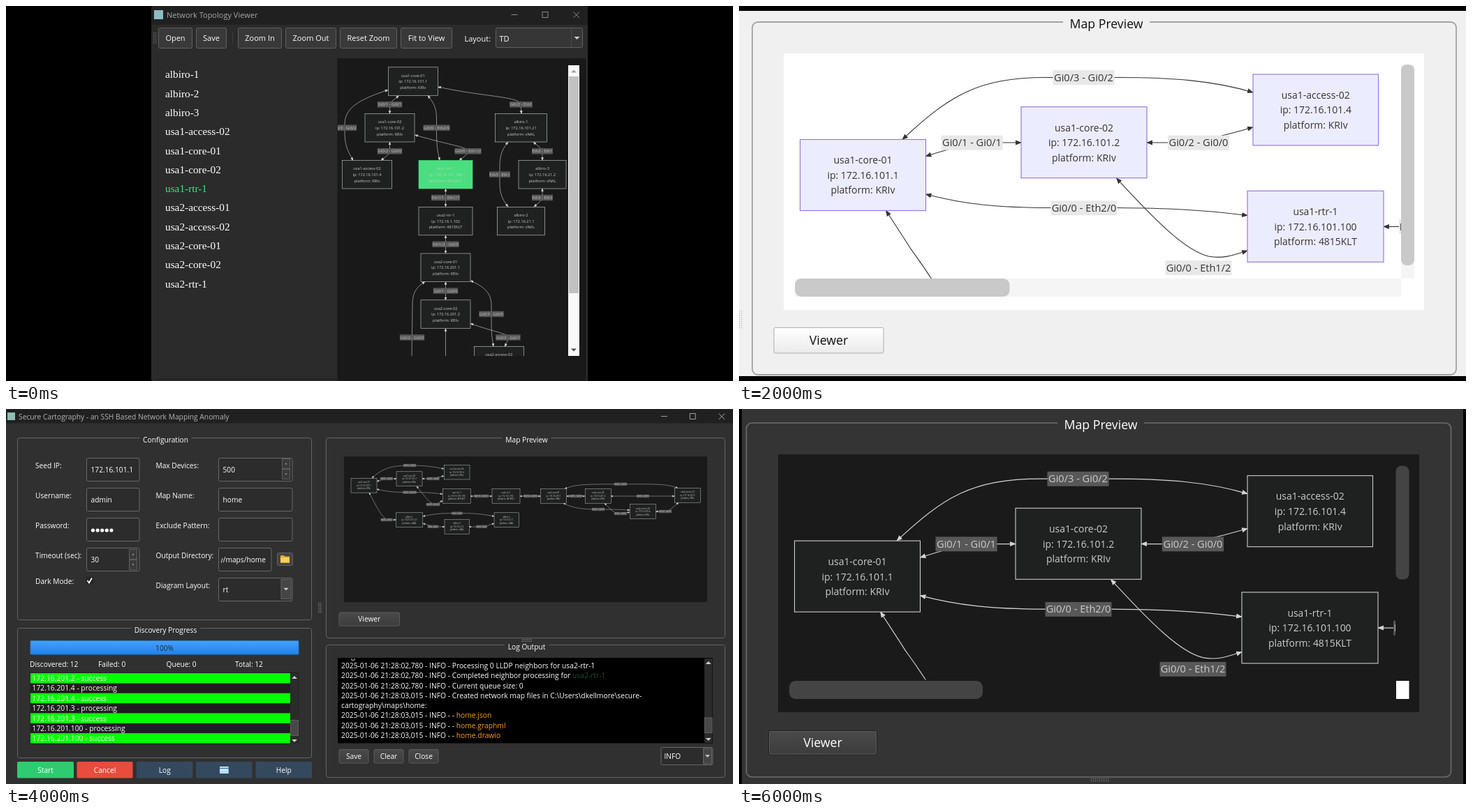
An HTML page for the animation above (8000 ms loop, 1041x538 px).

```html
<!DOCTYPE html>
<html lang="en">
<head>
<meta charset="utf-8">
<title>Network map viewer</title>
<style>
html, body { margin: 0; width: 100%; height: 100%; overflow: hidden; background: #000; }
svg { display: block; width: 1041px; height: 538px; font-family: "Open Sans", "Noto Sans", sans-serif; }
.scene { visibility: hidden; animation: show 8s step-end infinite; }
#preview-light { animation-delay: -6s; }
#main { animation-delay: -4s; }
#preview-dark { animation-delay: -2s; }
@keyframes show { 0% { visibility: visible; } 25%, 100% { visibility: hidden; } }
.edge { fill: none; }
.light .node { fill: #ececff; stroke: #9370db; }
.light .edge { stroke: #333; marker-start: url(#tipD); marker-end: url(#tipD); }
.light .tag { fill: #e8e8e8; }
.light text { fill: #333; }
.dark .node { fill: #1f2020; stroke: #ccc; }
.dark .edge { stroke: #d3d3d3; marker-start: url(#tipL); marker-end: url(#tipL); }
.dark .tag { fill: #585858; }
.dark text { fill: #ccc; }
.dark .hot .node { fill: #4ade80; stroke: #4ade80; }
.dark .hot text { fill: #b0d8b6; }
.graph .open { marker-end: none; }
</style>
</head>
<body>
<svg viewBox="0 0 1041 538">
  <defs>
    <marker id="tipD" viewBox="0 0 10 10" refX="9" refY="5" markerWidth="8" markerHeight="8" orient="auto-start-reverse"><path d="M0 1L10 5L0 9z" fill="#333"/></marker>
    <marker id="tipL" viewBox="0 0 10 10" refX="9" refY="5" markerWidth="8" markerHeight="8" orient="auto-start-reverse"><path d="M0 1L10 5L0 9z" fill="#d3d3d3"/></marker>
    <linearGradient id="pale" x2="0" y2="1"><stop stop-color="#fff"/><stop offset="1" stop-color="#ebebeb"/></linearGradient>
    <linearGradient id="dim" x2="0" y2="1"><stop stop-color="#4a4a4a"/><stop offset="1" stop-color="#3c3c3c"/></linearGradient>
    <linearGradient id="blue" x2="0" y2="1"><stop stop-color="#45a0ff"/><stop offset="1" stop-color="#1f82ea"/></linearGradient>
    <clipPath id="topoClip"><path d="M475 85H805V502H475z"/></clipPath>
    <clipPath id="mapClip"><path d="M80 84H948V391H80z"/></clipPath>
    <clipPath id="logClip"><path d="M475 358H1000V479H475z"/></clipPath>
    <clipPath id="dirClip"><path d="M308 200H378V231H308z"/></clipPath>
  </defs>
  <g class="scene" id="viewer"></g>
  <g class="scene" id="preview-light"></g>
  <g class="scene" id="main"></g>
  <g class="scene" id="preview-dark"></g>
</svg>
<script>
const rect = (x, y, w, h, fill, more = '') =>
  `<rect x="${x}" y="${y}" width="${w}" height="${h}" fill="${fill}" ${more}/>`;
const path = (d, stroke, more = '') => `<path d="${d}" fill="none" stroke="${stroke}" ${more}/>`;
const fillPath = (d, fill) => `<path d="${d}" fill="${fill}"/>`;
// y is the middle of the line
const text = (x, y, s, size, fill = '#fff', more = '') =>
  `<text x="${x}" y="${y + size * 0.35}" font-size="${size}" fill="${fill}" ${more}>${s}</text>`;
const mid = (x, y, s, size, fill) => text(x, y, s, size, fill, 'text-anchor="middle"');
const box = (x, y, w, h, fill, stroke, r = 2) =>
  rect(x + 0.5, y + 0.5, w - 1, h - 1, fill, `stroke="${stroke}" rx="${r}"`);
const button = (x, y, w, h, s, size, fill = 'url(#dim)', stroke = '#5c5c5c', ink = '#fff') =>
  box(x, y, w, h, fill, stroke) + mid(x + w / 2, y + h / 2, s, size, ink);
const tri = (x, y, r, dir, fill) =>
  fillPath(`M${x - r} ${y - dir * r / 2}h${2 * r}l${-r} ${dir * r}z`, fill);
const dots = (x, y, cols, rows, step, fill) => {
  let s = '';
  for (let i = 0; i < cols * rows; i++)
    s += rect(x + (i % cols) * step, y + Math.floor(i / cols) * step, 1.3, 1.3, fill);
  return s;
};
const put = (id, parts) => { document.getElementById(id).innerHTML = parts.flat().join(''); };

const devices = {
  c1: ['usa1-core-01', '172.16.101.1', 'KRIv'],
  c2: ['usa1-core-02', '172.16.101.2', 'KRIv'],
  a2: ['usa1-access-02', '172.16.101.4', 'KRIv'],
  r1: ['usa1-rtr-1', '172.16.101.100', '4815KLT'],
  R1: ['usa2-rtr-1', '172.16.1.102', '4815KLT'],
  C1: ['usa2-core-01', '172.16.201.1', 'KRIv'],
  C2: ['usa2-core-02', '172.16.201.2', 'KRIv'],
  A1: ['usa2-access-01', '172.16.201.3', 'KRIv'],
  A2: ['usa2-access-02', '172.16.201.4', 'KRIv'],
  x1: ['albiro-1', '172.16.101.21', 'vNAL'],
  x2: ['albiro-2', '172.16.21.1', 'vNAL'],
  x3: ['albiro-3', '172.16.21.2', 'vNAL'],
};

// nodes: [id, x, y, w]; tags: [x, y, text]; an edge starting with "!" has no end tip
function graph(theme, size, h, line, nodes, edges, tags, hot) {
  const node = ([id, x, y, w]) => {
    const [name, ip, kind] = devices[id];
    const rows = [name, 'ip: ' + ip, 'platform: ' + kind];
    return `<g class="${id === hot ? 'hot' : ''}">` +
      rect(x, y, w, h, 'none', `class="node" stroke-width="${line}"`) +
      rows.map((s, i) => mid(x + w / 2, y + h / 2 + 0.04 * size + (i - 1) * size * 1.545, s, size)).join('') + '</g>';
  };
  const edge = d => `<path class="edge ${d[0] === '!' ? 'open' : ''}" stroke-width="${line}" d="${d.replace('!', '')}"/>`;
  const tag = ([x, y, s]) => {
    const w = s.length * size * 0.486, th = size * 1.5;
    return rect(x - w / 2, y - th / 2, w, th, '', 'class="tag"') + mid(x, y, s, size * 1.045);
  };
  return `<g class="graph ${theme}">` + edges.map(edge).join('') + nodes.map(node).join('') + tags.map(tag).join('') + '</g>';
}

const controls = (x, y, gap, ink) =>
  path(`M${x - 4} ${y}h9M${x + gap - 4} ${y - 4}h8v8h-8zM${x + 2 * gap - 4} ${y - 4}l8.500 8.500m0 -8.500l-8.500 8.500`, ink);

// Topology window
const topo = graph('dark', 5.6, 40.5, 0.6, [
  ['c1', 547.3, 87.8, 71], ['c2', 514, 154.5, 71], ['a2', 481.5, 221.5, 71], ['r1', 591, 221.5, 77],
  ['R1', 591, 288.3, 77], ['C1', 594, 355, 71], ['C2', 594, 421.8, 71], ['A2', 670.3, 488.5, 71],
  ['x1', 700.5, 154.5, 74], ['x3', 734, 221.5, 68], ['x2', 703.5, 288.3, 68],
], [
  'M547 120.500C503 135 485 147 485 170V180C485 199 489 208 497 221.500',
  'M562.500 128.500C553 137 549.500 138 549.500 141V154.500',
  'M604 128.500C613 140 616.500 146 616.500 162V182C616.500 200 618 208 621 221.500',
  'M618.500 116C682 130 737 130 737 141L738 154.500',
  'M549.500 195V208C549 213 545 215 537 221.500',
  'M585.500 185C640 201 661 202 661 208S658 214 649 221.500',
  'M629.500 262V288', 'M629.500 329V355', 'M629.500 395.500V422',
  '!M600 395.500C585 405 582 414 582 430L581 506',
  'M665 394C688 404 695 414 695 430V452C695 470 696 477 698 488.500',
  'M665 455.500C700 468 719 470 719 475S717 483 714 488.500',
  '!M629.500 462.500V506',
  'M755 195C764 203 768 205 768 208V221.500', 'M768 262V275C768 278 764 281 756 288',
  'M719 195C710 206 707 215 707 230V254C707 270 711 278 719 288',
], [
  [549.5, 141.3, 'Gi0/1 - Gi0/1'], [484.5, 174.7, 'Gi0/3 - Gi0/2'], [616.5, 174.7, 'Gi0/0 - Eth2/0'],
  [737.5, 141.3, 'Gi0/2 - Eth1'], [549.5, 208.3, 'Gi0/2 - Gi0/0'], [661.5, 208.3, 'Gi0/0 - Eth1/2'],
  [629.5, 275, 'Eth1/1 - Eth1/1'], [629.5, 341.8, 'Eth1/2 - Gi0/0'], [629.5, 408.6, 'Gi0/1 - Gi0/0'],
  [581.5, 475.5, 'Gi0/2 - Gi0/0'], [695, 442, 'Gi0/3 - Gi0/0'], [719, 475.5, 'Gi0/2 - Gi0/1'],
  [768, 208.3, 'Eth2 - Eth1'], [707, 241.6, 'Eth3 - Eth1'], [768, 275, 'Eth3 - Eth3'],
], 'r1');

const hosts = Object.values(devices).map(d => d[0]).sort();
put('viewer', [
  rect(0, 0, 1041, 538, '#000'),
  rect(208, 0, 625, 538, '#2b2b2b'),
  rect(208, 0, 625, 27, '#202020'),
  rect(212, 6, 13, 13, '#8fbcc4'),
  text(230, 13, 'Network Topology Viewer', 11, '#a8a8a8'),
  controls(727.5, 12.5, 44.5, '#8c8c8c'),
  dots(211, 38, 2, 6, 2.9, '#777'),
  [['Open', 218, 49], ['Save', 272, 44], ['Zoom In', 332, 63], ['Zoom Out', 400, 73], ['Reset Zoom', 478, 82], ['Fit to View', 565, 74]]
    .map(([s, x, w]) => button(x, 31, w, 30, s, 11, '#393939', '#606060')),
  path('M324.500 37v18', '#3d3d3d'),
  text(656.5, 47, 'Layout:', 11),
  box(701, 31, 125, 29, '#363636', '#606060'),
  text(706.5, 47, 'TD', 11),
  path('M809.500 32v27', '#4a4a4a'),
  tri(817.5, 46, 4, 1, '#d0d0d0'),
  rect(212, 535, 262, 1, '#1c1c1c'),
  rect(474.5, 75, 356, 463, '#191919'),
  hosts.map((s, i) => text(228, 98 + i * 27.3, s, 15.3, s === 'usa1-rtr-1' ? '#4ade80' : '#fff',
    'font-family="Liberation Serif, Times New Roman, serif"')),
  `<g clip-path="url(#topoClip)">${topo}</g>`,
  rect(805, 85, 16, 417, '#f8f8f8'),
  rect(806, 101, 14, 311, '#c1c1c1'),
  tri(813, 93.5, 4, -1, '#a0a0a0'),
  tri(813, 493.5, 4, 1, '#505050'),
]);

// Zoomed preview, drawn in both themes
const zoomMap = theme => graph(theme, 13.95, 102, 1.1, [
  ['c1', 87.5, 191.5, 180], ['c2', 404, 144.7, 180], ['a2', 736, 98, 179.5], ['r1', 728, 265.3, 195],
], [
  'M234 191.500C300 130 340 102.500 440 102.500H540C620 102.500 680 107 736 124',
  'M267.500 215.500C310 202 330 196 360 196H404',
  'M584 196H614C660 196 690 187 736 174',
  'M267.500 270C320 284 370 289.500 447 289.500H541C610 290 660 292 728 300.500',
  'M540.500 247C600 312 640 351 672 359C692 363 707 358 728 351',
  '!M210.500 293.500L240 339C250 356 252 355 276 392',
  '!M923 316.500H950',
], [
  [493.5, 102.7, 'Gi0/3 - Gi0/2'], [333.5, 196.2, 'Gi0/1 - Gi0/1'], [658, 196.2, 'Gi0/2 - Gi0/0'],
  [494, 289.8, 'Gi0/0 - Eth2/0'], [658, 375.7, 'Gi0/0 - Eth1/2'], [996, 316.5, 'Eth1/1 - Eth1/1'],
]);

const group = (x, y, w, h, s, size, bg, line, ink, gap, lw = 1) =>
  rect(x, y, w, h, 'none', `stroke="${line}" stroke-width="${lw}" rx="${lw > 1 ? 8 : 3}"`) +
  rect(x + w / 2 + gap[0], y - 3, gap[1], 6, bg) + mid(x + w / 2 + gap[0] + gap[1] / 2, y + 2.8, s, size, ink);

put('preview-light', [
  rect(0, 0, 1041, 538, '#000'),
  rect(0, 7, 1041, 524, '#f0f0f0'),
  group(19, 23, 1008, 506, 'Map Preview', 17.7, '#f0f0f0', '#a3a3a3', '#111', [-59, 124], 1.8),
  rect(64, 68, 917, 368, '#fff'),
  `<g clip-path="url(#mapClip)">${zoomMap('light')}</g>`,
  rect(948, 84, 19, 307, '#f5f5f5'),
  rect(80, 391, 868, 26, '#f5f5f5'),
  rect(948, 84, 19, 288, '#c9c9c9', 'rx="8"'),
  rect(80, 391, 307.5, 26, '#c9c9c9', 'rx="9"'),
  button(49.5, 461, 158, 37.5, 'Viewer', 17.7, 'url(#pale)', '#adadad', '#111'),
  dots(0, 437, 2, 9, 3, '#b8b8b8'),
]);

put('preview-dark', [
  rect(0, 0, 1041, 538, '#000'),
  rect(4, 0, 1033, 538, '#343434'),
  group(10.5, 20, 1009, 508, 'Map Preview', 17.7, '#343434', '#6c6c6c', '#fff', [-59, 124], 1.6),
  rect(56, 65, 918, 370, '#1a1a1a'),
  `<g transform="translate(-8 -2.400)" clip-path="url(#mapClip)">${zoomMap('dark')}</g>`,
  rect(940.5, 81.5, 19, 163, '#444', 'rx="8"'),
  rect(72, 390, 277, 26, '#444', 'rx="9"'),
  rect(941, 390, 18.5, 26, '#fff'),
  button(42, 461, 156, 35.5, 'Viewer', 17.7, 'url(#dim)', '#1f1f1f'),
  rect(43.5, 462.5, 153, 32.5, 'none', 'stroke="#5d5d5d" rx="2"'),
  dots(504, 530, 9, 2, 3, '#858585'),
]);

// Main window
const overview = graph('dark', 2.87, 20.8, 0.45, [
  ['c1', 494, 99.3, 37], ['c2', 559, 89.8, 37], ['a2', 627.3, 80.2, 36.7], ['r1', 625.3, 114.4, 40],
  ['R1', 696, 114.4, 40], ['C1', 765.6, 114.4, 37], ['C2', 829.3, 114.4, 37], ['A1', 957.5, 113.4, 37],
  ['A2', 893.4, 136.6, 37], ['x1', 558.4, 148.8, 38.4], ['x3', 628, 158.4, 35.3], ['x2', 699, 148.8, 35.3],
], [
  'M524 99C540 84 555 81 578 81S615 83 627 86', 'M531 104C540 101 545 100 559 100',
  'M531 115C550 119.500 560 119.500 578 119.500S610 120 625 122', 'M596 100H606C612 100 618 98 627 96',
  'M588 111C603 129 608 138 617 136L625 131.500', 'M520 120C532 143 540 159 548 159H558.500',
  'M597 154C615 150 625 149.500 646 149.500S680 150 699 154', 'M597 164C606 167 612 169 628 169',
  'M663 169H678C686 169 690 167 699 164', 'M665 125H696', 'M736 125H765.500', 'M802.500 125H829',
  'M866 125H957.500', 'M800 114.400C815 108 830 107.800 880 107.800S945 107 962 113.400',
  'M798 135C812 143 830 144 848 144S875 144 893 145', 'M857 135C866 144 870 150 880 150L893 148',
  'M930.500 147H944C950 147 954 141 963 134.400',
], [
  [578, 81, 'Gi0/3 - Gi0/2'], [545, 100, 'Gi0/1 - Gi0/1'], [578, 119.5, 'Gi0/0 - Eth2/0'],
  [611.5, 100, 'Gi0/2 - Gi0/0'], [611.5, 137, 'Gi0/0 - Eth1/2'], [545, 159, 'Gi0/2 - Eth1'],
  [646, 149.6, 'Eth3 - Eth1'], [611.5, 168.8, 'Eth2 - Eth1'], [681, 168.8, 'Eth3 - Eth3'],
  [680.7, 125, 'Eth1/1 - Eth1/1'], [751, 125, 'Eth1/2 - Gi0/0'], [816, 125, 'Gi0/1 - Gi0/0'],
  [912, 125, 'Gi0/3 - Gi0/1'], [880, 107.8, 'Gi0/2 - Gi0/0'], [848, 144, 'Gi0/3 - Gi0/0'],
  [880, 150, 'Gi0/2 - Gi0/1'], [944, 147, 'Gi0/2 - Gi0/2'],
]);

const bg = '#303030', edge = '#646464', fs = 10.2;
const panel = (x, y, w, h, s, gap) => group(x + 0.5, y + 0.5, w, h, s, fs, bg, edge, '#fff', [-gap / 2 + 1.5, gap]);
const field = (x, y, w, s = '') => box(x, y, w, 34, '#2c2c2c', '#686868') + text(x + 6.5, y + 17.3, s, fs);
const spin = (x, y) => [0, 15].map(d => box(x, y + d, 12, 15, '#3a3a3a', '#5c5c5c', 0) +
  tri(x + 6, y + d + 7.5, 1.6, d ? 1 : -1, '#ccc')).join('');
const drop = (x, y, w, h) => box(x, y, w, h, '#454545', '#646464', 0) + tri(x + w / 2, y + h / 2, 3.5, 1, '#d0d0d0');
const bar = (x, y, w, h, top, len) =>
  rect(x, y, w, h, '#2b2b2b') + box(x, top, w, len, '#484848', '#606060', 0) +
  tri(x + w / 2, y + 6, 4, -1, '#ccc') + tri(x + w / 2, y + h - 5, 4, 1, '#ccc');

const jobs = ['2 - success', '4 - processing', '4 - success', '3 - processing', '3 - success', '100 - processing', '100 - success'];
const stamp = ms => `2025-01-06 21:28:0${ms} - INFO - `;
const paint = (s, fill) => `<tspan fill="${fill}">${s}</tspan>`;
const log = [
  'lling',
  stamp('2,780') + 'Processing 0 LLDP neighbors for usa2-rtr-1',
  stamp('2,780') + 'Completed neighbor processing for ' + paint('usa2-rtr-1', '#1d4f22'),
  stamp('2,780') + 'Current queue size: 0',
  stamp('3,015') + 'Created network map files in C:\\Users\\dkellmore\\secure-',
  'cartography\\maps\\home:',
  ...['json', 'graphml', 'drawio'].map(s => stamp('3,015') + '- ' + paint('home.' + s, '#ff9d1e')),
];

put('main', [
  rect(0, 0, 1041, 538, bg),
  rect(0, 0, 1041, 20.5, '#202020'),
  rect(2, 5, 11, 11, '#8fbcb4'),
  text(18, 11, 'Secure Cartography - an SSH Based Network Mapping Anomaly', 10.28, '#b4b4b4'),
  controls(942, 10.5, 41.3, '#a0a0a0'),
  panel(16, 41, 421, 261, 'Configuration', 74),
  panel(16, 314, 421, 186, 'Discovery Progress', 98),
  panel(458, 41, 571, 287, 'Map Preview', 70),
  panel(458, 338, 571, 190, 'Log Output', 64),

  ['Seed IP:', 'Username:', 'Password:', 'Timeout (sec):'].map((s, i) => text(42, 81 + i * 43, s, fs)),
  text(42, 247, 'Dark Mode:', fs),
  ['Max Devices:', 'Map Name:', 'Exclude Pattern:', 'Output Directory:', 'Diagram Layout:'].map((s, i) => text(214.5, 81 + i * 43, s, fs)),
  ['172.16.101.1', 'admin', '', '30'].map((s, i) => field(115, 70 + i * 43, 76.5, s)),
  [0, 1, 2, 3, 4].map(i => `<circle cx="${124.5 + i * 6.6}" cy="174" r="2.600" fill="#fff"/>`),
  spin(176, 201),
  rect(114.5, 240.5, 11, 11, '#262626'),
  path('M116.500 246l2.500 3.500l4 -7', '#fff', 'stroke-width="1.700"'),
  ['500', 'home', ''].map((s, i) => field(304, 70 + i * 43, 106.5, s)),
  spin(395, 71),
  field(304, 199, 76.5),
  `<g clip-path="url(#dirClip)">${text(372, 216.3, 'cartography/maps/home', fs, '#fff', 'text-anchor="end"')}</g>`,
  box(388, 206, 23, 19, '#444', '#626262'),
  fillPath('M393 210h5l1.500 1.500h6.500v9h-13z', '#e8a82c'),
  rect(393, 213, 13, 7.5, '#ffcf57'),
  field(304, 242, 106.5, 'rt').replace('y="262', 'y="262'),
  drop(393.5, 244, 15, 29),

  box(34.5, 332, 385, 20.5, 'url(#blue)', '#2a78c8', 1),
  mid(227, 343, '100%', fs, '#1d2a38'),
  [[34, 'Discovered: 12'], [132, 'Failed: 0'], [229.5, 'Queue: 0'], [328, 'Total: 12']].map(([x, s]) => text(x, 366, s, fs)),
  rect(34.5, 378, 385, 103, '#1f1f1f'),
  jobs.map((s, i) => (i % 2 ? '' : rect(35, 379 + i * 14.35, 372, 14.4, '#0f0')) +
    text(37.5, 386.5 + i * 14.35, '172.16.201.' + s, 10.3)),
  bar(407, 379, 12, 102, 446, 23),
  [['Start', 16, 81, '#2ecc71'], ['Cancel', 101.5, 80, '#e74c3c'], ['Log', 187, 80.5, '#34495e'], ['', 272, 80.5, '#34495e'], ['Help', 357.5, 80.5, '#34495e']]
    .map(([s, x, w, c]) => rect(x, 506, w, 23.5, c, 'rx="1.500"') + mid(x + w / 2, 518, s, fs)),
  rect(306, 513, 12.5, 10, '#eef4f8'),
  rect(306, 514.5, 12.5, 2, '#3f8fd0'),
  rect(306, 518.5, 12.5, 4.5, '#b9dcf2'),

  rect(484, 68, 520, 209, '#1a1a1a'),
  overview,
  button(476.5, 291.5, 87.5, 20, 'Viewer', fs),
  dots(738.5, 330, 6, 2, 2.6, '#858585'),
  dots(447.5, 278, 2, 6, 2.6, '#858585'),

  rect(475, 357, 537, 122.5, '#000'),
  `<g clip-path="url(#logClip)">${log.map((s, i) => text(480, 354 + i * 14.3, s, 10.3)).join('')}</g>`,
  bar(1000, 358, 11.5, 121, 442.5, 22.5),
  [['Save', 476.5], ['Clear', 526.5], ['Close', 576.5]].map(([s, x]) => button(x, 488, 43, 20.5, s, fs)),
  box(937.5, 485, 75, 26, '#2c2c2c', '#686868'),
  text(942.5, 498.3, 'INFO', fs),
  drop(998, 486.5, 13, 23),
]);
</script>
</body>
</html>
```
